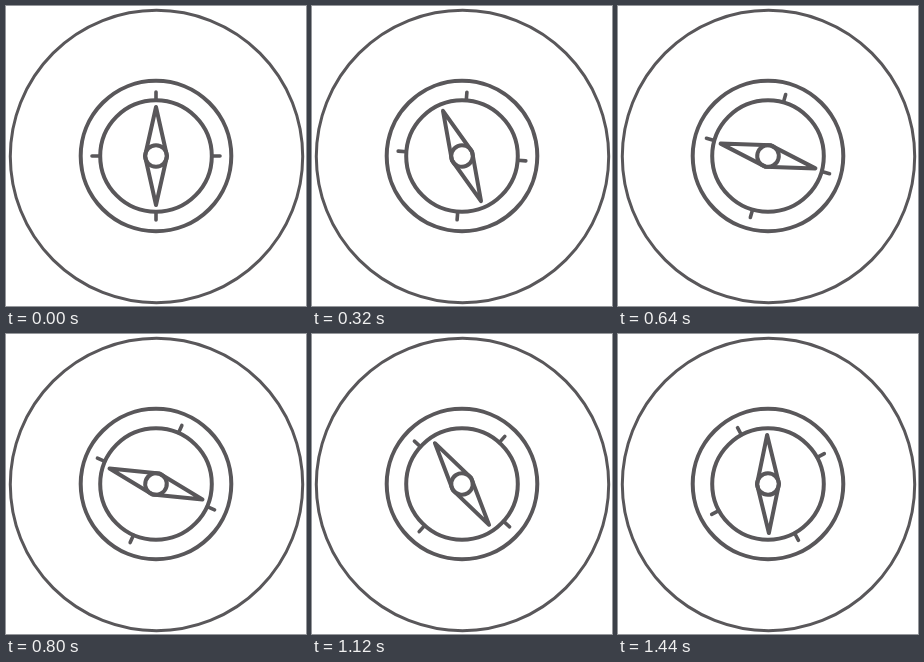
Animation of 300 by 300 pixels, one loop 1480 ms. Source, as an HTML page:

```html
<!DOCTYPE html>
<html>
<head>
<meta charset="utf-8">
<title>Compass</title>
<style>
  html, body { margin: 0; height: 100%; overflow: hidden; background: #fff; }
  svg { display: block; width: 100vw; height: 100vh; }
</style>
</head>
<body>
<svg viewBox="0 0 300 300" fill="none" stroke="#59575a" stroke-width="4" stroke-linecap="round" stroke-linejoin="round">
  <circle cx="150.5" cy="150.5" r="146.2" stroke-width="3"/>
  <g transform="translate(150 150)">
    <circle r="75.3"/>
    <circle r="55.8"/>
    <path id="ticks" d="M0-64V-56M64 0H56M0 64V56M-64 0H-56" stroke-width="3.6"/>
    <g id="needle">
      <path d="M0-49L11 0L0 49L-11 0Z"/>
      <circle r="10.8"/>
    </g>
  </g>
</svg>
<script>
  const STEP = 40, LOOP = 1480;
  const ticks = document.getElementById('ticks');
  const needle = document.getElementById('needle');

  // Smooth ease from 0 to 1 between two moments
  function ease(t, from, to) {
    const x = Math.min(1, Math.max(0, (t - from) / (to - from)));
    return x * x * (3 - 2 * x);
  }

  function draw(now) {
    const t = Math.floor(now % LOOP / STEP) * STEP;
    const swing = ease(t, 120, 670) - ease(t, 680, 1496);
    ticks.setAttribute('transform', `rotate(${108.9 * ease(t, 0, 2648)})`);
    needle.setAttribute('transform', `rotate(${-76 * swing})`);
    requestAnimationFrame(draw);
  }

  draw(0);
</script>
</body>
</html>
```
